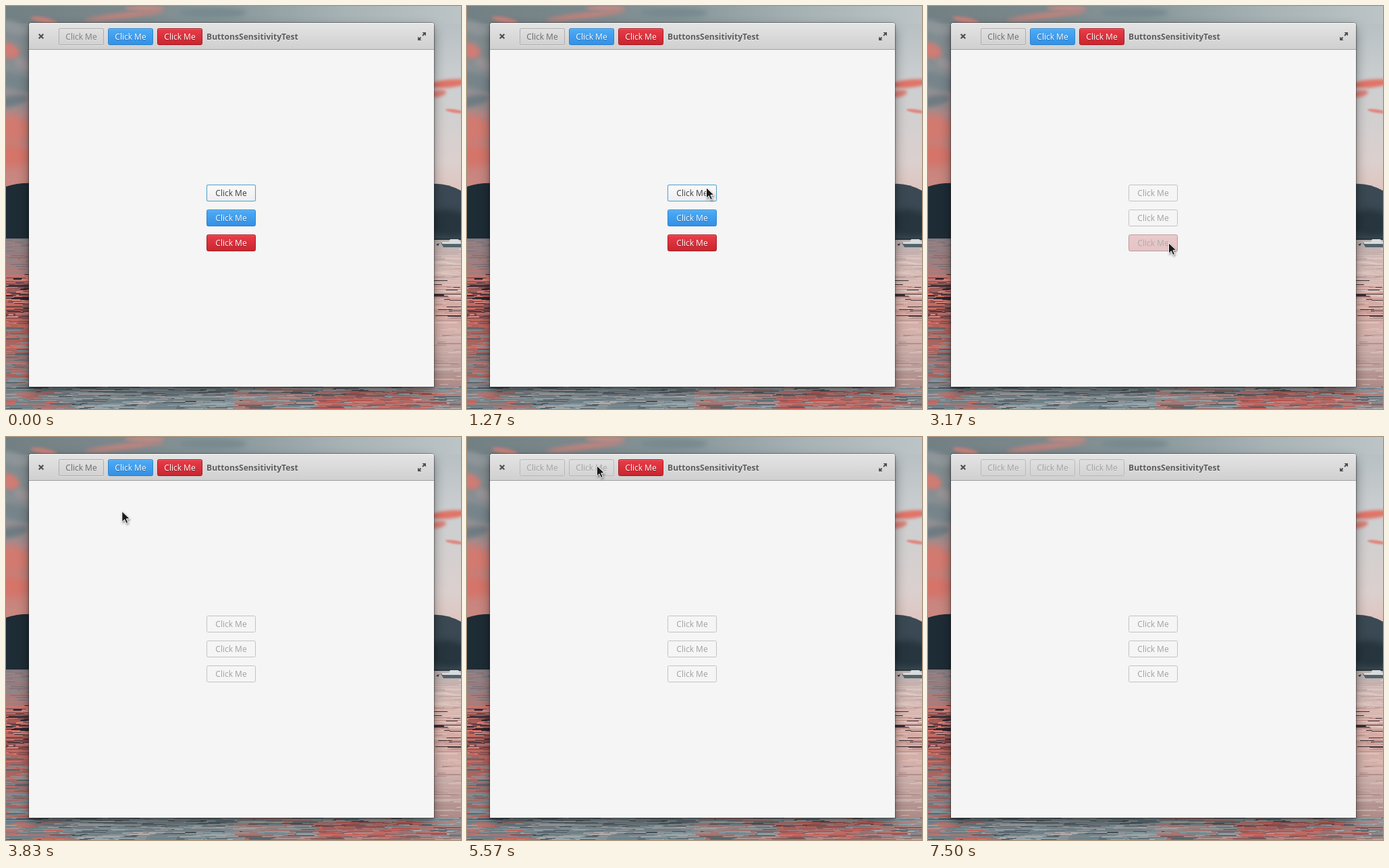
Write an HTML page with a canvas that moves like this. It is 674 by 598 pixels and loops after 8260 ms.

```html
<!DOCTYPE html>
<html lang="en">
<head>
<meta charset="utf-8">
<title>Button sensitivity</title>
<style>
  html, body { margin: 0; width: 100%; height: 100%; overflow: hidden; }
  body { position: relative; font: 12px/25px "Open Sans", sans-serif; }
  canvas, .window, .header, .button, .face, .title, svg { position: absolute; box-sizing: border-box; }
  canvas { left: 0; top: 0; }
  .window {
    left: 34px; top: 25px; width: 600px; height: 540px;
    background: #f5f5f5; border-radius: 4px 4px 0 0;
    box-shadow: 0 0 0 1px rgba(0,0,0,.32), 0 3px 5px rgba(0,0,0,.2), 0 8px 18px rgba(0,0,0,.38);
  }
  .header {
    width: 600px; height: 40px; border-radius: 4px 4px 0 0;
    background: linear-gradient(#e4e4e4, #d0d0d0);
    border-bottom: 1px solid #a0a0a0;
    box-shadow: inset 0 1px rgba(255,255,255,.6);
  }
  .title { left: 297px; top: 33px; font-size: 12.1px; font-weight: bold; color: #5c5c5c; text-shadow: 0 1px rgba(255,255,255,.45); }
  .button, .face { height: 25px; border-radius: 2.5px; text-align: center; line-height: 23px; border: 1px solid; }
  .button { color: #a0a0a0; border-color: #c3c3c3; }
  .button.bar { border-color: #b9b9b9; text-shadow: 0 1px rgba(255,255,255,.35); }
  .face { inset: -1px; }
  .plain { color: #3d3d3d; border-color: #5fa5d0; background: linear-gradient(#fafafa, #eee); box-shadow: 0 0 1px #64b5ea, inset 0 0 1px #9fd0ee; }
  .bar .plain { color: #666; border-color: #adadad; background: linear-gradient(#dfdfdf, #d2d2d2); box-shadow: 0 1px rgba(255,255,255,.35), inset 0 1px rgba(255,255,255,.3); }
  .blue, .red { color: #fff; text-shadow: 0 1px 1px rgba(0,0,0,.35); box-shadow: inset 0 1px rgba(255,255,255,.18); }
  .blue { border-color: #2e83cb; background: linear-gradient(#4dabf6, #3390e5); }
  .red { border-color: #a81c25; background: linear-gradient(#ea3c48, #c9262f); }
  svg { left: 0; top: 0; overflow: visible; }
</style>
</head>
<body>
<canvas id="photo" width="674" height="598"></canvas>
<div class="window"><div class="header"></div></div>
<div class="title">ButtonsSensitivityTest</div>
<svg width="674" height="598" fill="none" stroke="#505050">
  <path d="M48.7 41.7l6.6 6.6m0-6.6l-6.6 6.6" stroke-width="2.2"/>
  <path d="M617 44l3-3M611.5 49.5l3-3" stroke-width="2"/>
  <path d="M616.5 39h5.5v5.5zM610 45.5v5.5h5.5z" fill="#505050" stroke="none"/>
</svg>
<div id="buttons"></div>
<svg id="pointer" width="20" height="24" style="filter:drop-shadow(1px 2px 1.5px rgba(0,0,0,.4))">
  <path d="M.5.5V16.2L4.3 12.7L6.8 18.5L9.5 17.3L7 11.6H12Z" fill="#1a1a1a" stroke="#fff"/>
</svg>
<script>
const LOOP = 8260;
const clamp = v => Math.max(0, Math.min(1, v));
const ease = v => v * v * (3 - 2 * v);

function paintPhoto() {
  const g = document.getElementById('photo').getContext('2d');
  let seed = 17;
  const random = () => (seed = seed * 16807 % 2147483647) / 2147483647;
  const fade = (x, y, w, h, dx, dy, ...colors) => {
    const paint = g.createLinearGradient(x, y, x + dx, y + dy);
    colors.forEach((c, i) => paint.addColorStop(i / (colors.length - 1), c));
    g.fillStyle = paint;
    g.fillRect(x, y, w, h);
  };
  const cloud = (x, y, rx, ry, color, tilt = 0, blur = 3) => {
    g.filter = `blur(${blur}px)`;
    g.fillStyle = color;
    g.beginPath();
    g.ellipse(x, y, rx, ry, tilt, 0, 7);
    g.fill();
    g.filter = 'none';
  };
  const shape = (color, path) => { g.fillStyle = color; g.fill(new Path2D(path)); };

  // Sky
  fade(0, 0, 337, 346, 0, 346, '#7b898d', '#8b9195', '#c9847d', '#c9908a');
  fade(337, 0, 337, 346, 0, 346, '#b2bcbf', '#cccfd1', '#dbd0ce', '#e4b1a5');
  fade(0, 0, 674, 26, 674, 0, '#728084', '#7b888c', '#8a999d', '#a8b3b6', '#bcc4c6');
  cloud(10, 32, 26, 9, '#8e9599', .3);
  cloud(4, 66, 17, 11, '#cf7c74', .4);
  cloud(26, 86, 14, 8, '#9a9497', .4);
  cloud(14, 112, 32, 12, '#77858b', .3);
  cloud(8, 141, 24, 8, '#6f7b82', -.2);
  cloud(8, 182, 30, 22, '#d27a70', 0, 6);
  cloud(8, 222, 30, 16, '#d57469', 0, 6);
  cloud(30, 160, 12, 5, '#b3888a', -.3);
  cloud(56, 21, 20, 4, '#ca817a', .2, 2);
  cloud(176, 14, 60, 4, '#c5837d', -.12);
  cloud(205, 3, 30, 2.5, '#d08a83', 0, 2);
  cloud(306, 10, 50, 7, '#788a8f');
  cloud(656, 115, 28, 6, '#e07468', -.1, 2);
  cloud(640, 130, 12, 5, '#dc8178', -.2, 2);
  cloud(665, 156, 14, 2.5, '#df857b', .15, 1);

  // Hills and water
  shape('#1e2c36', 'M0 268Q18 262 40 263V346H0Z');
  shape('#3a4953', 'M630 264Q652 262 674 274V346H630Z');
  cloud(655, 322, 34, 20, '#27353e', .1, 5);
  fade(0, 345, 337, 253, 0, 253, '#847b81', '#b37b78', '#b5625b', '#a9645f', '#7c848a', '#77868c');
  fade(337, 345, 337, 253, 0, 253, '#b9aeaf', '#d8bdb7', '#d6aaa3', '#d3b2ad', '#b39692', '#a4716d');
  const streaks = (count, x, w, y, h, colors) => {
    for (let i = 0; i < count; i++) {
      g.fillStyle = colors[Math.floor(random() * colors.length)];
      g.fillRect(x - 20 + random() * w, Math.floor(y + random() * h), 10 + random() * 40, random() < .8 ? 1 : 2);
    }
  };
  streaks(60, 0, 50, 348, 50, ['#91858a', '#766f78', '#9d807f']);
  streaks(130, 0, 50, 398, 74, ['#2c262e', '#dc7468', '#cf877f', '#6b3f45']);
  streaks(120, 0, 50, 470, 95, ['#cc6b62', '#86969c', '#5a656c', '#a9615c']);
  streaks(45, 634, 64, 360, 45, ['#dfc8c2', '#c5aaa7']);
  streaks(75, 634, 64, 402, 60, ['#3a3138', '#e0bcb4', '#bf8a85', '#dfc6c1']);
  streaks(65, 634, 64, 462, 100, ['#e0c2bb', '#b48f8c', '#c9b1ae']);
  streaks(600, 0, 700, 564, 34, ['#8799a0', '#98a5a9', '#6d7f87', '#454e56', '#b0a9a9']);
  streaks(75, 0, 85, 568, 30, ['#c16b64', '#b17874', '#707e84']);
  streaks(200, 470, 170, 571, 27, ['#bd5c57', '#c96b64', '#8d5c5e', '#b0817e']);
  g.fillStyle = '#29343b';
  g.fillRect(634, 345, 40, 2);

  // Boat
  shape('#53636b', 'M644 351H674V358H648Z');
  shape('#d6dbdc', 'M645 350H674V353H646ZM658 346H670L673 350H656Z');
  shape('#30393f', 'M637 354l5-2-2 4z');
}

const buttons = [];
function addButton(x, y, width, kind, press) {
  const base = document.createElement('div');
  base.className = 'button' + (y < 65 ? ' bar' : '');
  base.style.cssText = `left:${x}px;top:${y}px;width:${width}px`;
  base.textContent = 'Click Me';
  const face = document.createElement('div');
  face.className = 'face ' + kind;
  face.textContent = 'Click Me';
  base.append(face);
  document.getElementById('buttons').append(base);
  buttons.push({ face, press });
}
['plain', 'blue', 'red'].forEach((kind, i) => {
  addButton(78 + 73 * i, 33, 67, kind, [4370, 5070, 5900][i]);
  addButton(297, 265 + 37 * i, 73, kind, [1400, 2200, 2930][i]);
});

// Pointer legs: start, end, x, y, sideways bend
const legs = [
  [570, 1270, 354, 269, 0],
  [1850, 2200, 357, 306, 0],
  [2500, 2770, 356, 351, 0],
  [3500, 3980, 130, 38, -260],
  [4700, 4930, 191, 42, 0],
  [5560, 5730, 257, 46, 0],
  [7090, 7500, 590, 139, 0],
];
const pointer = document.getElementById('pointer');
const barFace = document.querySelector('.bar .plain');

function draw(t) {
  let x = 676, y = 444;
  for (const [start, end, toX, toY, bend] of legs) {
    const k = ease(clamp((t - start) / (end - start)));
    x += (toX - x) * k + bend * k * (1 - k) ** 2;
    y += (toY - y) * k;
  }
  pointer.style.transform = `translate(${x}px,${y}px)`;
  pointer.style.visibility = t >= 570 && t < 7500 ? 'visible' : 'hidden';

  for (const { face, press } of buttons) {
    const down = clamp((t - press) / 80);
    face.style.filter = down ? `brightness(${1 - .12 * down})` : 'none';
    face.style.opacity = 1 - ease(clamp((t - press - 110) / 190));
  }
  const grey = 122 - 20 * clamp((t - 30) / 240);
  barFace.style.color = `rgb(${grey},${grey},${grey})`;
}

function tick() {
  draw(performance.now() % LOOP);
  requestAnimationFrame(tick);
}
paintPhoto();
tick();
</script>
</body>
</html>
```
